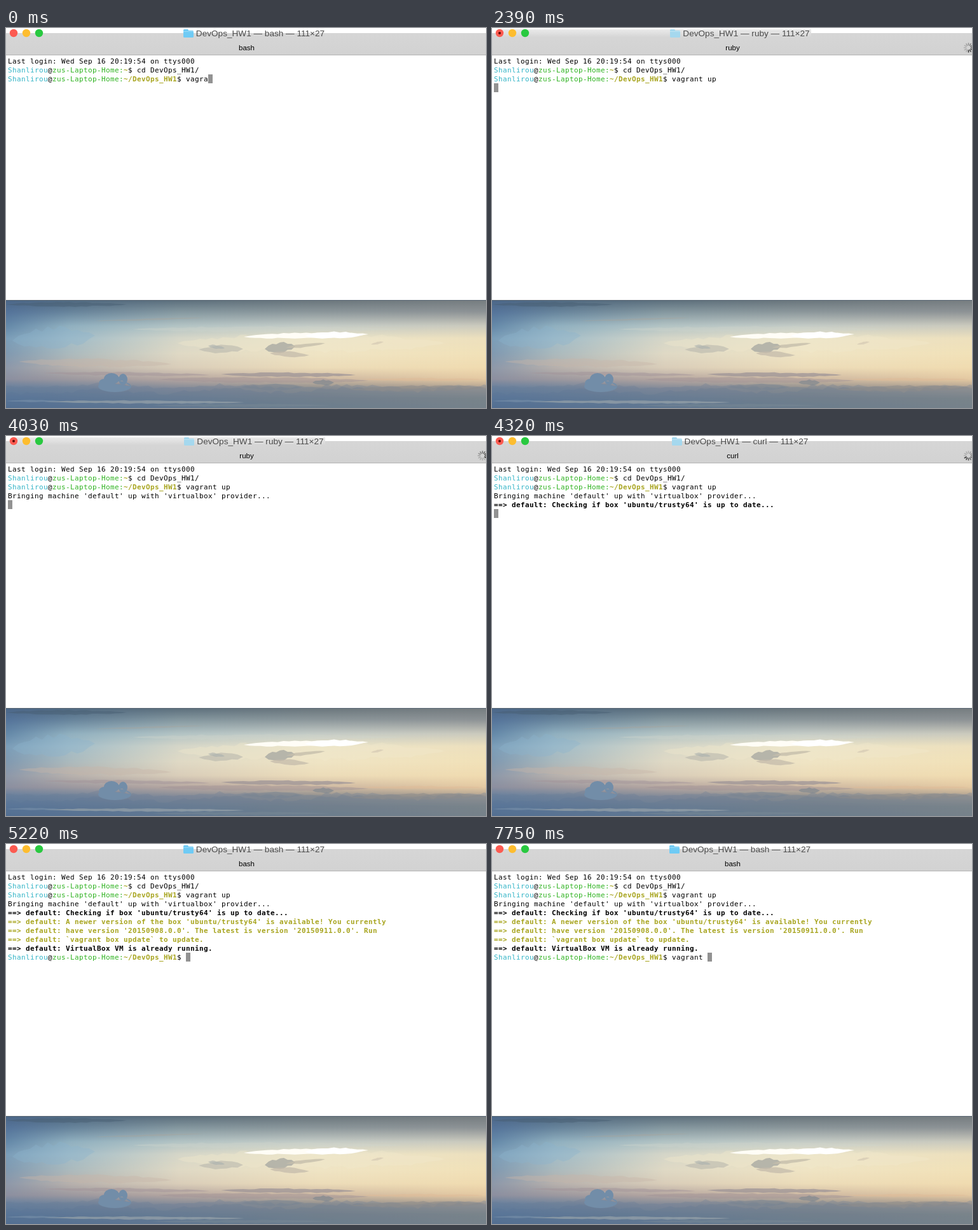
An HTML page with a canvas that plays this animation: 755x598 px, repeating every 8 s.

```html
<!DOCTYPE html>
<html lang="en">
<head>
<meta charset="utf-8">
<title>Terminal</title>
<style>
  html, body { margin: 0; width: 755px; height: 598px; overflow: hidden; background: #fff; }
  canvas { display: block; }
</style>
</head>
<body>
<canvas id="stage" width="755" height="598"></canvas>
<script>
const W = 755, H = 598, LOOP = 8000;
const CELL = 7, LINE = 14, LEFT = 3, TOP = 45;
const MONO = '"DejaVu Sans Mono", monospace';
const SANS = '"Liberation Sans", Arial, sans-serif';
const BLACK = '#000', CYAN = '#33b4c6', GREEN = '#2fb321', OLIVE = '#a8a520';
const SKY_TOP = 428;

const ctx = document.getElementById('stage').getContext('2d');

// ---------- timeline ----------
const firstTyping = [[0, 'vagra'], [300, 'vagran'], [450, 'vagrant'], [900, 'vagrant '],
  [1350, 'vagrant u'], [1500, 'vagrant up']];
const secondTyping = [[5220, ''], [5820, 'va'], [6410, 'vag'], [6710, 'vagr'],
  [6860, 'vagra'], [7010, 'vagran'], [7450, 'vagrant'], [7750, 'vagrant ']];
const processes = [[0, 'bash'], [1940, 'ruby'], [4320, 'curl'], [5220, 'bash']];
const SPIN = { start: 2240, end: 5220, step: 148.5 };

const valueAt = (steps, t) => steps.filter(([at]) => at <= t).pop()[1];

// ---------- terminal text ----------
const plain = text => [{ text, color: BLACK }];
const bold = (text, color = BLACK) => [{ text, color, bold: true }];
const prompt = (path, command) => [
  { text: 'Shanlirou', color: CYAN },
  { text: '@', color: BLACK },
  { text: 'zus-Laptop-Home:', color: GREEN },
  { text: path, color: OLIVE, bold: true },
  { text: '$ ' + command, color: BLACK }
];

const output = [
  [4030, plain("Bringing machine 'default' up with 'virtualbox' provider...")],
  [4320, bold("==> default: Checking if box 'ubuntu/trusty64' is up to date...")],
  [4770, bold("==> default: A newer version of the box 'ubuntu/trusty64' is available! You currently", OLIVE)],
  [4770, bold("==> default: have version '20150908.0.0'. The latest is version '20150911.0.0'. Run", OLIVE)],
  [4770, bold('==> default: `vagrant box update` to update.', OLIVE)],
  [5070, bold('==> default: VirtualBox VM is already running.')]
];

function linesAt(t) {
  const lines = [
    plain('Last login: Wed Sep 16 20:19:54 on ttys000'),
    prompt('~', 'cd DevOps_HW1/'),
    prompt('~/DevOps_HW1', valueAt(firstTyping, t))
  ];
  for (const [at, line] of output) if (t >= at) lines.push(line);
  if (t >= 5220) lines.push(prompt('~/DevOps_HW1', valueAt(secondTyping, t)));
  else if (t >= 1800) lines.push([]);
  return lines;
}

function drawTerminal(t) {
  ctx.textAlign = 'left';
  let col = 0;
  const lines = linesAt(t);
  lines.forEach((line, row) => {
    col = 0;
    for (const part of line) {
      ctx.font = (part.bold ? 'bold ' : '') + '11px ' + MONO;
      ctx.letterSpacing = '0px';
      ctx.letterSpacing = CELL - ctx.measureText('0').width + 'px';
      ctx.fillStyle = part.color;
      ctx.fillText(part.text, LEFT + col * CELL, TOP + row * LINE + 11);
      col += part.text.length;
    }
  });
  ctx.letterSpacing = '0px';
  ctx.fillStyle = '#929292';
  ctx.fillRect(LEFT + col * CELL, TOP + (lines.length - 1) * LINE, CELL, LINE);
}

// ---------- window frame ----------
function disc(x, y, r, color) {
  ctx.fillStyle = color;
  ctx.beginPath();
  ctx.arc(x, y, r, 0, Math.PI * 2);
  ctx.fill();
}

function verticalFill(x, y, w, h, from, to) {
  const g = ctx.createLinearGradient(0, y, 0, y + h);
  g.addColorStop(0, from);
  g.addColorStop(1, to);
  ctx.fillStyle = g;
  ctx.fillRect(x, y, w, h);
}

function drawFolder(x, y, color) {
  ctx.fillStyle = color;
  ctx.beginPath();
  ctx.roundRect(x, y, 8, 5, 1.5);
  ctx.roundRect(x, y + 2, 16, 11, 1.5);
  ctx.fill();
  ctx.fillStyle = 'rgba(255,255,255,.3)';
  ctx.fillRect(x, y + 3, 16, 1);
}

function drawSpinner(t) {
  const lead = Math.floor((t - SPIN.start) / SPIN.step) * 2 + 4;
  ctx.lineWidth = 1.6;
  ctx.lineCap = 'round';
  for (let i = 0; i < 12; i++) {
    const age = (((lead - i) % 12) + 12) % 12;
    const a = i * Math.PI / 6 - Math.PI / 2;
    ctx.strokeStyle = `rgba(40,40,40,${0.9 - Math.min(age, 8) * 0.085})`;
    ctx.beginPath();
    ctx.moveTo(749.5 + Math.cos(a) * 4, 31 + Math.sin(a) * 4);
    ctx.lineTo(749.5 + Math.cos(a) * 7, 31 + Math.sin(a) * 7);
    ctx.stroke();
  }
}

function drawWindow(t) {
  const process = valueAt(processes, t);
  const busy = t >= 1940 && t < 5220;
  ctx.fillStyle = '#fff';
  ctx.fillRect(0, 0, W, SKY_TOP);
  verticalFill(0, 8, W, 34, '#d6d6d6', '#d2d2d2');
  if (process === 'ruby') verticalFill(10, 2, 492, 12, '#eaeaea', '#d6d6d6');
  ctx.fillStyle = '#b4b4b4';
  ctx.fillRect(0, 42, W, 1);

  ['#fc5b51', '#fdbd2f', '#29c940'].forEach((color, i) => disc(12 + i * 20, 8, 6.2, color));
  if (busy) disc(12, 8, 2, '#5c0b06');

  const title = `DevOps_HW1 — ${process} — 111×27`;
  ctx.font = '13.6px ' + SANS;
  ctx.textAlign = 'center';
  ctx.fillStyle = '#4a4a4a';
  ctx.fillText(title, 400, 13);
  drawFolder(Math.round(400 - ctx.measureText(title).width / 2) - 20, 2, busy ? '#a5d8ee' : '#6fcbf5');

  ctx.font = '11.5px ' + SANS;
  ctx.fillStyle = BLACK;
  ctx.fillText(process, 378.5, 35);
  if (t >= SPIN.start && t < SPIN.end) drawSpinner(t);
}

// ---------- painted sky ----------
const STOPS = [0, 0.13, 0.36, 0.65, 1];
const SKY = [
  [428, '#4c6788 #506980 #5c6f7c #6a767c #767d80'],
  [446, '#54739a #66839b #84979f #8b969a #8d9295'],
  [468, '#6488a8 #8fafbf #b2c3c4 #c4cbc6 #cbcabd'],
  [488, '#7a9db8 #a1bcc8 #d5d6c8 #ebe4c9 #ede0bd'],
  [512, '#8099b0 #aab9bd #dfd9c5 #efe4c4 #f1e1b8'],
  [534, '#8d98a9 #b6b0ac #d9cdb9 #ecdcb9 #f0dbb0'],
  [552, '#8c8f9f #9c989f #b5a6a0 #cdb8a2 #e4c9a2'],
  [566, '#667f9d #70839b #858b98 #92918f #b1a291'],
  [582, '#54749a #5d7897 #6d7f92 #7e8587 #8d8d84'],
  [598, '#49688f #516e92 #60788f #748288 #868a84']
].map(([y, colors]) => ({
  y,
  colors: colors.split(' ').map(c => [1, 3, 5].map(i => parseInt(c.slice(i, i + 2), 16)))
}));

function paintSky() {
  const canvas = document.createElement('canvas');
  canvas.width = W;
  canvas.height = H - SKY_TOP;
  const g = canvas.getContext('2d');
  g.translate(0, -SKY_TOP);

  for (let y = SKY_TOP; y < H; y++) {
    const i = SKY.findIndex(row => row.y > y);
    const a = SKY[i - 1], b = SKY[i];
    const k = (y - a.y) / (b.y - a.y);
    const fill = g.createLinearGradient(0, 0, W, 0);
    STOPS.forEach((stop, s) => {
      const rgb = a.colors[s].map((v, c) => Math.round(v + (b.colors[s][c] - v) * k));
      fill.addColorStop(stop, `rgb(${rgb})`);
    });
    g.fillStyle = fill;
    g.fillRect(0, y, W, 1);
  }

  let seed = 17;
  const random = () => (seed = (seed * 16807) % 2147483647) / 2147483647;

  // Tapered brush stroke with ragged edges.
  function streak(x, y, w, h, color, tilt = 0) {
    const n = Math.max(8, Math.round(w / 9));
    const edge = (i, side) => {
      const u = i / n;
      const r = h / 2 * Math.pow(Math.sin(Math.PI * u), 0.6) * (0.65 + random() * 0.5);
      g.lineTo(x + u * w, y + tilt * u + side * r);
    };
    g.fillStyle = color;
    g.beginPath();
    for (let i = 0; i <= n; i++) edge(i, -1);
    for (let i = n; i >= 0; i--) edge(i, 1);
    g.fill();
  }

  function cloudBank(y, amp, slope, color) {
    g.fillStyle = color;
    g.beginPath();
    g.moveTo(0, H);
    for (let x = 0; x <= W + 8; x += 8) {
      g.lineTo(x, y + slope * x / W + Math.sin(x / 31) * amp * 0.5 + (random() - 0.5) * amp);
    }
    g.lineTo(W + 8, H);
    g.fill();
  }

  streak(0, 435, 190, 7, 'rgba(70,91,111,.45)');
  streak(140, 461, 170, 3, 'rgba(170,160,150,.35)', -5);
  streak(10, 492, 130, 34, 'rgba(139,178,203,.35)', -8);
  streak(200, 474, 420, 9, 'rgba(205,212,202,.35)');
  streak(270, 496, 420, 30, 'rgba(240,231,204,.35)');

  streak(374, 486, 196, 9, '#fffdf6', -4);
  streak(470, 484, 92, 11, '#fff', -1);

  streak(303, 506, 70, 13, 'rgba(185,184,174,.6)', -1);
  streak(318, 500, 26, 6, 'rgba(169,175,174,.6)', 4);
  streak(407, 505, 48, 16, 'rgba(164,166,161,.75)', -4);
  streak(415, 512, 62, 9, 'rgba(196,187,171,.75)', 3);
  streak(440, 503, 62, 6, 'rgba(198,190,172,.8)', -7);
  streak(574, 498, 20, 4, 'rgba(215,204,181,.8)', -4);

  streak(20, 525, 240, 13, 'rgba(197,181,169,.4)', 4);
  streak(60, 543, 260, 6, 'rgba(162,147,153,.5)', 3);
  streak(338, 545, 212, 7, 'rgba(158,148,151,.75)', 1);
  streak(240, 553, 330, 9, 'rgba(158,145,148,.45)', 2);
  streak(560, 553, 190, 5, 'rgba(223,188,152,.5)');

  cloudBank(562, 5, 3, 'rgba(104,124,148,.3)');
  cloudBank(573, 6, -5, 'rgba(86,113,143,.18)');

  // Cumulus tower on the horizon.
  g.fillStyle = '#728da8';
  g.beginPath();
  g.ellipse(166, 552, 12, 9, 0, 0, 7);
  g.ellipse(184, 553, 7, 9, 0, 0, 7);
  g.ellipse(155, 559, 9, 7, 0, 0, 7);
  g.ellipse(171, 564, 26, 9, 0, 0, 7);
  g.fill();
  streak(482, 558, 34, 9, 'rgba(130,137,145,.7)');
  streak(370, 565, 100, 10, 'rgba(119,131,146,.55)');
  streak(540, 569, 215, 10, 'rgba(138,139,138,.55)', -3);

  streak(60, 588, 315, 5, 'rgba(148,160,168,.75)', 1);
  streak(0, 587, 85, 3, 'rgba(126,149,173,.55)');
  streak(230, 594, 280, 5, 'rgba(126,141,150,.35)');

  g.fillStyle = '#596673';
  g.fillRect(0, SKY_TOP, W, 1);
  return canvas;
}

const sky = paintSky();

function frame() {
  const t = performance.now() % LOOP;
  drawWindow(t);
  drawTerminal(t);
  ctx.drawImage(sky, 0, SKY_TOP);
  requestAnimationFrame(frame);
}
frame();
</script>
</body>
</html>
```
